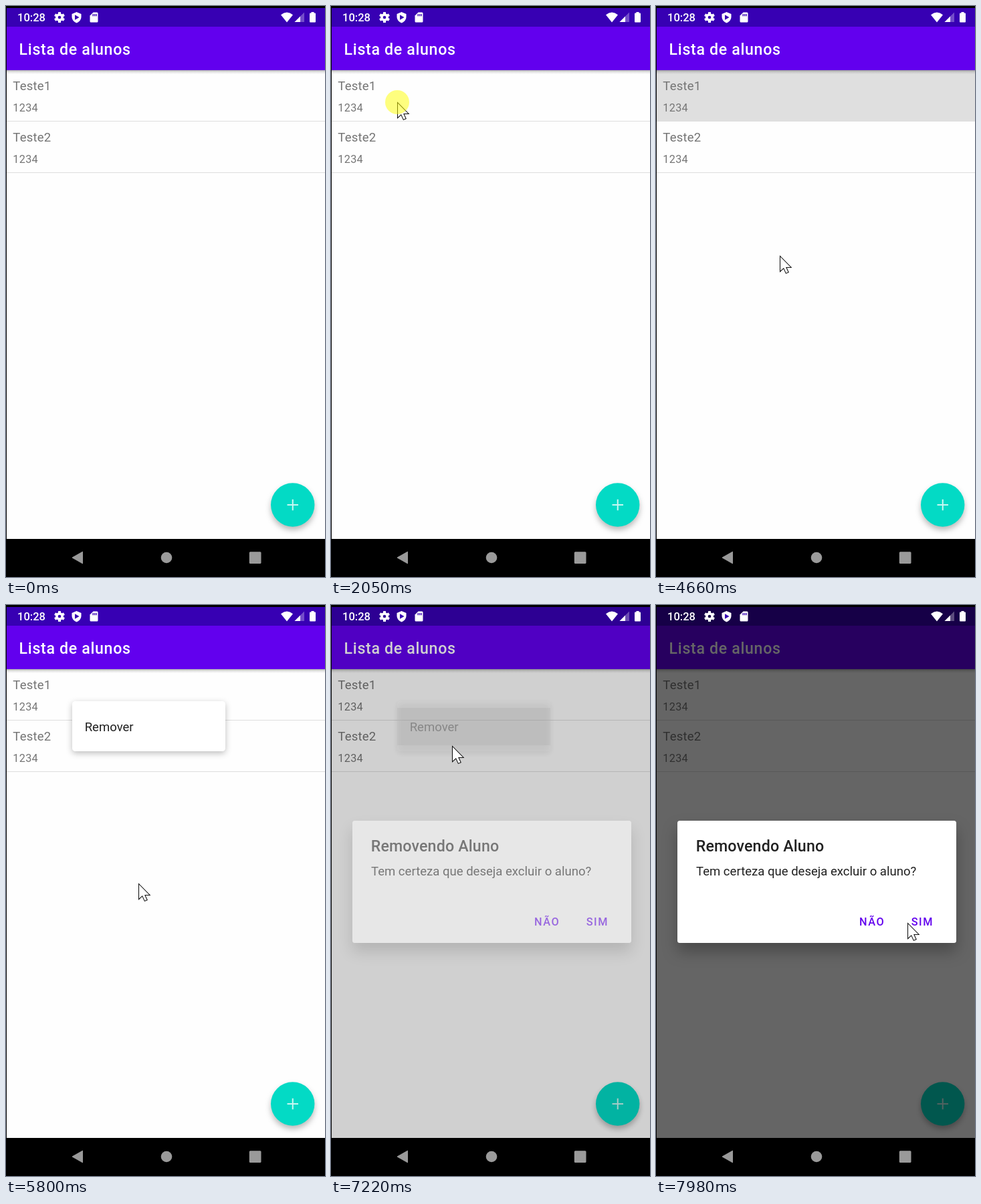
An HTML page that plays this animation: 477x855 px, repeating every 8000 ms.

```html
<!DOCTYPE html>
<html lang="pt">
<head>
<meta charset="utf-8">
<title>Lista de alunos</title>
<style>
  html, body { margin: 0; width: 100%; height: 100%; overflow: hidden; background: #000; }
  svg { display: block; width: 477px; height: 855px; font-family: Roboto, sans-serif; }
  .name { font-size: 18.56px; letter-spacing: .2px; fill: #757575; }
  .phone { font-size: 16.24px; letter-spacing: .3px; fill: #757575; }
  .head { font-size: 23.2px; font-weight: 500; }
  .body { font-size: 18.56px; fill: #212121; }
  .action { font-size: 16.24px; font-weight: 500; letter-spacing: 1.6px; fill: #6200ee; }
  #fab { filter: drop-shadow(0 5px 4px rgba(0, 0, 0, .27)); }
  #menuShadow { filter: blur(5px); }
  #dialogBox { filter: drop-shadow(0 13px 11px rgba(0, 0, 0, .27)); }
</style>
</head>
<body>
<svg viewBox="0 0 477 855">
  <defs>
    <linearGradient id="shade" x2="0" y2="1">
      <stop stop-color="#000" stop-opacity=".32"/>
      <stop offset=".4" stop-color="#000" stop-opacity=".12"/>
      <stop offset="1" stop-color="#000" stop-opacity="0"/>
    </linearGradient>
  </defs>
  <rect width="477" height="855"/>

  <!-- student list -->
  <rect x="1" y="96" width="476" height="702" fill="#fefefe"/>
  <rect id="pressed" x="1" y="96" width="476" height="77" fill="#dfdfdf"/>
  <g id="rows"></g>
  <rect x="1" y="96" width="476" height="6" fill="url(#shade)"/>

  <!-- bars and button -->
  <rect x="1" y="3" width="476" height="28" fill="#3700b3"/>
  <rect x="1" y="31" width="476" height="65" fill="#6200ee"/>
  <text class="head" x="19.6" y="73" fill="#fff" letter-spacing=".65">Lista de alunos</text>
  <circle id="fab" cx="428.7" cy="747" r="32.7" fill="#03dac5"/>
  <path d="M420.5 747H437M428.75 738.8V755.2" stroke="#fff" stroke-opacity=".78" stroke-width="2.1"/>

  <!-- context menu -->
  <rect id="menuShadow" x="99" y="147" width="229" height="75" rx="4.5" fill-opacity=".26"/>
  <g id="menu">
    <rect x="99" y="144" width="229" height="75" rx="4.5" fill="#fff"/>
    <rect id="hover" x="99" y="154" width="229" height="56" fill="#e4e4e4"/>
    <text class="body" x="117.7" y="189">Remover</text>
  </g>

  <rect id="dim" x="1" y="3" width="476" height="795"/>

  <!-- status icons -->
  <g fill="#fff">
    <text x="17" y="23" font-size="16.5" font-weight="500">10:28</text>
    <circle cx="80" cy="17" r="4.1" fill="none" stroke="#fff" stroke-width="3.6"/>
    <g id="teeth"></g>
    <path d="M105.5 9L112.5 12V16.5Q112.3 22.5 105.5 25.5Q98.7 22.5 98.5 16.5V12Z"/>
    <path d="M103 13.2L109.6 17L103 20.8Z" fill="#3700b3"/>
    <path d="M130.5 9.5H136Q137.5 9.5 137.5 11V23Q137.5 24.5 136 24.5H127Q125.5 24.5 125.5 23V14.5Z"/>
    <path d="M130.2 12V15.2M132.6 12V15.2M135 12V15.2" stroke="#3700b3" stroke-width="1.4"/>
    <path d="M411 13.2Q420 6 429 13.2L420 24.5Z"/>
    <path d="M446 9.5V24H431.5Z" fill-opacity=".3"/>
    <path d="M440 15.5V24H431.5Z"/>
    <rect x="456.5" y="9" width="4" height="3"/>
    <rect x="454" y="10.6" width="9" height="14" rx="1"/>
  </g>

  <!-- navigation -->
  <g fill="#9a9a9a">
    <path d="M99 826L114.5 817.2V834.8Z" stroke="#9a9a9a" stroke-linejoin="round"/>
    <circle cx="240" cy="826" r="8.3"/>
    <rect x="363.8" y="817.2" width="17.7" height="17.7" rx="1.5"/>
  </g>

  <g id="dialog">
    <rect id="dialogBox" x="32" y="323" width="417" height="183" rx="3.5" fill="#fff"/>
    <text class="head" x="59.8" y="369" fill="#212121" letter-spacing=".15">Removendo Aluno</text>
    <text class="body" x="60" y="405">Tem certeza que deseja excluir o aluno?</text>
    <text class="action" x="304" y="480">NÃO</text>
    <text class="action" x="381.7" y="480">SIM</text>
  </g>

  <path id="cursor" d="M.5 .5V23.7L5.8 18.9L9.3 26.4L13.2 24.7L9.9 17.5H17.2Z" fill="#fff" stroke="#111" stroke-width="1.05"/>
  <circle id="click" r="18" fill="#ff0" fill-opacity=".5"/>
</svg>
<script>
  const $ = id => document.getElementById(id);
  const LOOP = 8000, TICK = 200 / 3;

  ['Teste1', 'Teste2'].forEach((name, i) => {
    $('rows').innerHTML += `<g transform="translate(0 ${77 * i})">
      <text class="name" x="10.3" y="126">${name}</text>
      <text class="phone" x="10.3" y="158">1234</text>
      <path d="M1 76.5H477" transform="translate(0 96)" stroke="#dedede"/></g>`;
  });
  for (let a = 0; a < 360; a += 60) {
    $('teeth').innerHTML += `<rect x="78" y="9" width="4" height="4" rx=".5" transform="rotate(${a} 80 17)"/>`;
  }

  const smooth = p => p * p * (3 - 2 * p);
  const speedUp = p => p * p;

  // Progress 0..1 from a start time, advancing once per tick.
  const ramp = (t, start, ticks) =>
    Math.min(1, Math.max(0, Math.floor((t - start + 4) / TICK) / ticks));

  // Pointer trips: start, ticks, destination, easing.
  const trips = [
    [490, 6, 398, 748, smooth],
    [983, 11, 101, 146, smooth],
    [1853, 1, 99, 144, smooth],
    [3513, 1, 98, 141, smooth],
    [3580, 1, 100, 139, smooth],
    [3913, 6, 198, 366, smooth],
    [4313, 3, 185, 374, smooth],
    [5400, 6, 198, 417, smooth],
    [5800, 5, 187, 198, smooth],
    [7150, 2, 175, 223, smooth],
    [7313, 10, 376, 476, speedUp]
  ];

  function pointer(t) {
    let x = 430, y = 815;
    for (const [start, ticks, toX, toY, ease] of trips) {
      const p = ease(ramp(t, start, ticks));
      x += (toX - x) * p;
      y += (toY - y) * p;
    }
    return [Math.round(x), Math.round(y)];
  }

  const set = (id, name, value) => $(id).setAttribute(name, value);
  const show = (id, on) => set(id, 'visibility', on ? 'visible' : 'hidden');

  function draw(t) {
    const menu = ramp(t, 5333, 3) - ramp(t, 7083, 3);
    set('pressed', 'opacity', ramp(t, 2253, 3) - ramp(t, 5333, 3));
    set('menu', 'opacity', menu);
    set('menuShadow', 'opacity', menu);
    set('hover', 'opacity', ramp(t, 6420, 3));
    set('dim', 'opacity', .6 * ramp(t, 7150, 3.33));
    set('dialog', 'opacity', ramp(t, 7150, 2));

    const move = `translate(${pointer(t)})`;
    set('cursor', 'transform', move);
    set('click', 'transform', move);
    show('cursor', t >= 490);
    show('click', (t >= 2050 && t < 3580) || (t >= 6350 && t < 6480));
  }

  const began = performance.now();
  function loop() {
    draw((performance.now() - began) % LOOP);
    requestAnimationFrame(loop);
  }
  draw(0);
  requestAnimationFrame(loop);
</script>
</body>
</html>
```
